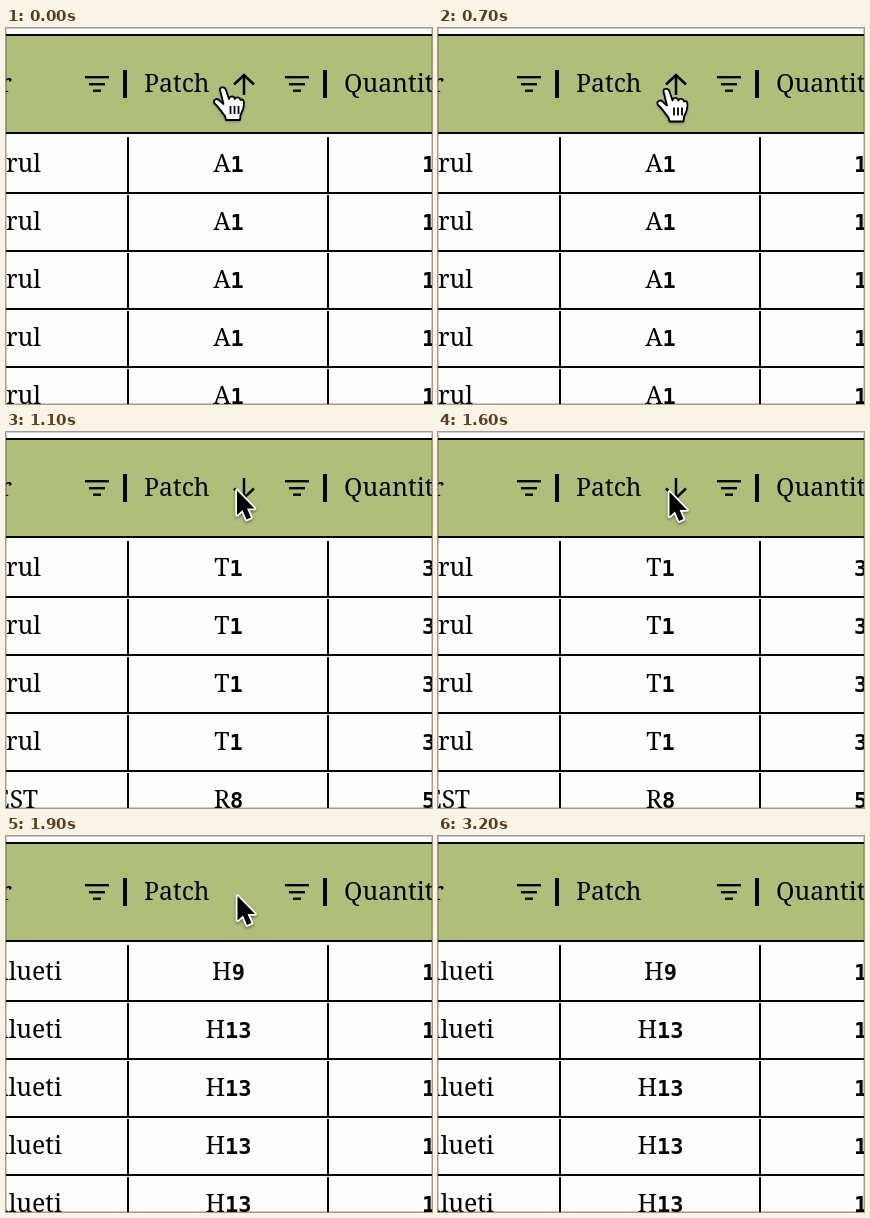
Animation of 426x376 px, one loop 3.7 s. Source, as an HTML page with a canvas:

```html
<!DOCTYPE html>
<html lang="en">
<head>
<meta charset="utf-8">
<title>Sorting a table column</title>
<style>
  html, body { margin: 0; width: 100%; height: 100%; overflow: hidden; background: #fdfdfd; }
  canvas { display: block; }
</style>
</head>
<body>
<canvas id="stage" width="426" height="376"></canvas>
<script>
const ctx = document.getElementById('stage').getContext('2d');
const LOOP = 3700, STEP = 100;
const GREEN = '#afbf7a', INK = '#050505', PAPER = '#fdfdfd';
const LETTERS = '24.8px "Noto Serif", serif';
const DIGITS = 'bold 22px "DejaVu Sans Mono", monospace';
const ROW_TOP = 106, ROW_HEIGHT = 58;

// Each row: [name, right edge of name, patch, quantity]
const ascending = Array(5).fill(['rul', 35, 'A1', '1']);
const descending = [...Array(4).fill(['rul', 35, 'T1', '3']), ['TEST', 32, 'R8', '5']];
const unsorted = ['H9', 'H13', 'H13', 'H13', 'H13'].map(patch => ['ilueti', 56, patch, '1']);

const hand = new Path2D(`M-4 3C-5 0 1 -1 2 3L5 12C6 8.5 10 8.5 11 12
  C12 9.5 16 10 16.5 13C19 11.5 20 14 20 17C20 22 18 25 16.5 28L16 33L2 33L1 29
  C-2 26 -5 20 -9.5 16.5C-12 13 -7 10 -4 14L-.5 17Z`);
const handLines = new Path2D('M6.5 19V27M10.5 19V27M14.5 19V27');
const arrow = new Path2D('M0 0V24.5L5.5 19.5L9.5 29L14 27L10 18H17.5Z');

function rect(color, x, y, w, h) {
  ctx.fillStyle = color;
  ctx.fillRect(x, y, w, h);
}

function text(string, x, y, align = 'left', font = LETTERS) {
  ctx.font = font;
  ctx.textAlign = align;
  ctx.fillStyle = INK;
  ctx.fillText(string, x, y);
}

// One serif letter followed by bold digits, centred as a whole.
function patchCode(code, center, y) {
  ctx.font = LETTERS;
  const letterWidth = ctx.measureText(code[0]).width;
  ctx.font = DIGITS;
  const width = letterWidth + ctx.measureText(code.slice(1)).width;
  const left = center - width / 2;
  text(code[0], left, y);
  text(code.slice(1), left + letterWidth, y, 'left', DIGITS);
}

function filterIcon(x) {
  rect(INK, x - 12, 48, 24, 2.4);
  rect(INK, x - 8, 55, 16, 2.4);
  rect(INK, x - 4, 61.5, 8, 2.4);
}

function sortIcon(direction) {
  ctx.save();
  ctx.translate(238, 56.5);
  ctx.scale(1, direction);
  ctx.strokeStyle = INK;
  ctx.lineWidth = 2.5;
  ctx.stroke(new Path2D('M0 10.5V-9M-10 0L0 -9.5L10 0'));
  ctx.restore();
}

function drawHeader(t) {
  rect(GREEN, 0, 8, 426, 96);
  rect(INK, 0, 6, 426, 2);
  rect(INK, 0, 104, 426, 2);
  text('r', 6, 64, 'right');
  text('Patch', 138, 64);
  text('Quantity', 338, 64);
  for (const x of [91, 291]) {
    filterIcon(x);
    rect(INK, x + 26, 42, 4, 28);
  }
  if (t < 1700) sortIcon(t < 1000 ? 1 : -1);
}

function drawRows(rows) {
  rows.forEach(([name, edge, patch, quantity], i) => {
    const top = ROW_TOP + i * ROW_HEIGHT, baseline = top + 38;
    rect(INK, 0, top + ROW_HEIGHT, 426, 2);
    for (const x of [121, 321]) rect(INK, x, top + 3, 2, ROW_HEIGHT - 3);
    text(name, edge, baseline, 'right');
    patchCode(patch, 222.5, baseline);
    text(quantity, 416, baseline, 'left', DIGITS);
  });
}

function drawHand(x, y) {
  ctx.translate(x, y);
  withShadow(() => { ctx.fillStyle = '#fff'; ctx.fill(hand); });
  ctx.strokeStyle = '#000';
  ctx.lineWidth = 1.8;
  ctx.stroke(hand);
  ctx.stroke(handLines);
}

function drawArrow(x, y) {
  ctx.translate(x, y);
  ctx.strokeStyle = '#fff';
  ctx.lineWidth = 3.6;
  withShadow(() => ctx.stroke(arrow));
  ctx.fillStyle = '#000';
  ctx.fill(arrow);
}

function withShadow(paint) {
  ctx.shadowColor = 'rgba(0,0,0,.45)';
  ctx.shadowBlur = 3;
  ctx.shadowOffsetY = 1.5;
  paint();
  ctx.shadowColor = 'transparent';
}

const progress = (t, from, to) => Math.min(1, Math.max(0, (t - from) / (to - from)));

function drawPointer(t) {
  ctx.save();
  ctx.lineJoin = 'round';
  if (t < 1100) {
    const p = progress(t, 0, 700);
    const eased = p * p * (3 - 2 * p);
    drawHand(218 + 11.5 * eased, 59 + 1.5 * eased);
  } else {
    const drift = progress(t, 1300, 1600);
    ctx.globalAlpha = 1 - progress(t, 2900, 3200);
    drawArrow(231 + drift * 0.5, 58.5 + drift * 1.5);
  }
  ctx.restore();
}

function draw(t) {
  rect(PAPER, 0, 0, 426, 376);
  drawRows(t < 1000 ? ascending : t < 1700 ? descending : unsorted);
  drawHeader(t);
  ctx.strokeStyle = 'rgba(0,0,0,.2)';
  ctx.lineWidth = 1;
  ctx.strokeRect(0.5, 0.5, 425, 375);
  drawPointer(t);
}

const start = performance.now();
function tick() {
  const t = (performance.now() - start) % LOOP;
  draw(Math.floor(t / STEP) * STEP);
  requestAnimationFrame(tick);
}
tick();
</script>
</body>
</html>
```
